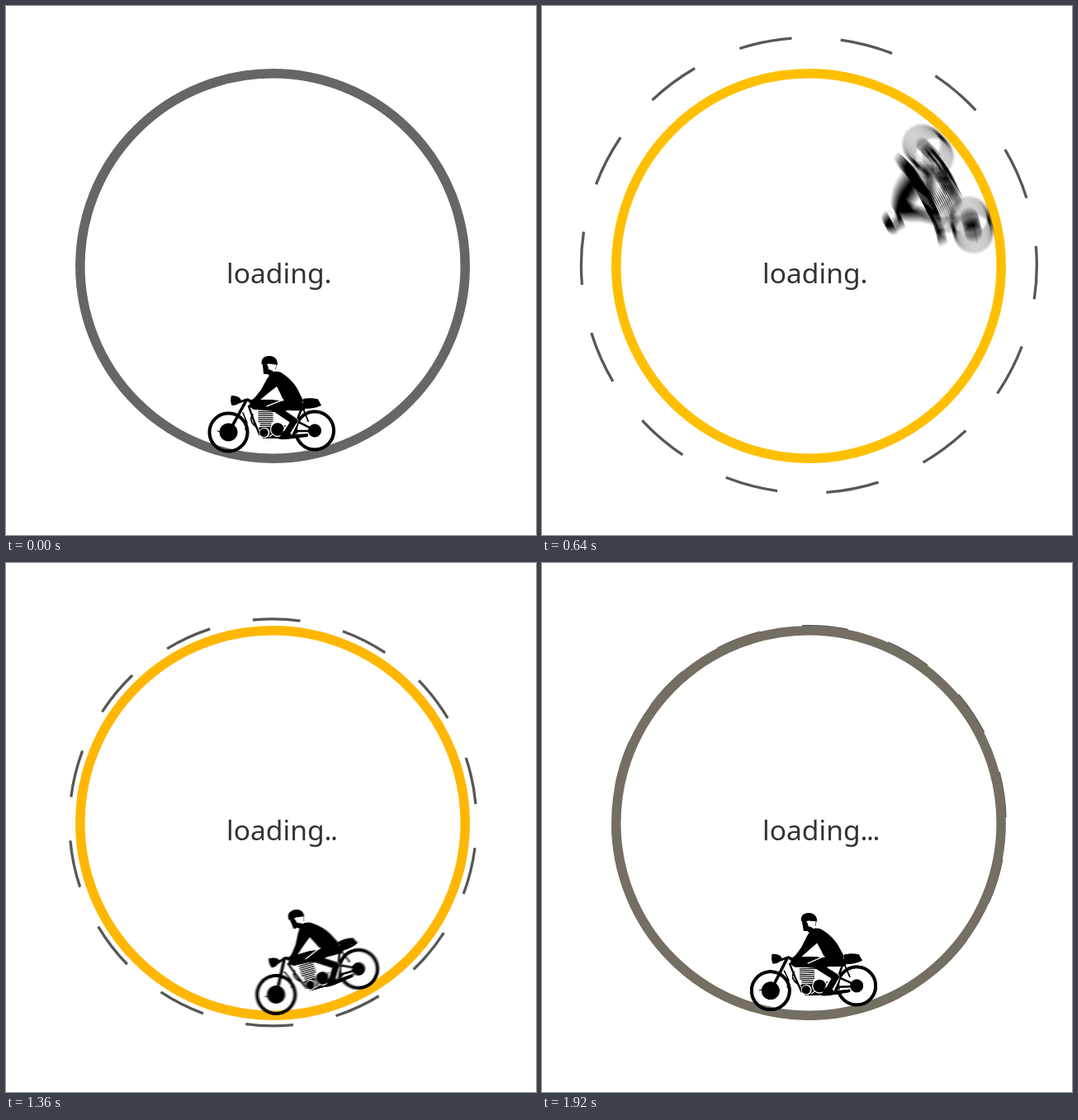
An HTML page with a canvas that plays this animation: 642x641 px, repeating every 1960 ms.

```html
<!DOCTYPE html>
<html lang="en">
<head>
<meta charset="utf-8">
<title>Loading</title>
<style>
  html, body { margin: 0; width: 100%; height: 100%; overflow: hidden; background: #fff; }
  svg, canvas { position: absolute; left: 0; top: 0; width: 642px; height: 641px; }
  text { font: 33.6px "Noto Sans", "Open Sans", sans-serif; fill: #333; }
  #dots { letter-spacing: -1.5px; }
</style>
</head>
<body>
<svg viewBox="0 0 642 641">
  <circle id="dashes" cx="323.4" cy="314.3" r="234" fill="none" stroke="#575757" stroke-width="3.3"
    pathLength="360" stroke-dasharray="13.4 12.3143"/>
  <circle id="ring" cx="323" cy="315" r="233.2" fill="none" stroke="#666" stroke-width="11.5"/>
  <text x="267" y="336">loading<tspan id="dots">.</tspan></text>
</svg>
<canvas id="stage" width="642" height="641"></canvas>
<script>
const LOOP = 1960, STEP = 40, SHUTTER = 19;
const PIVOT = { x: 321, y: 317 };
const BOX = { x: 225, y: 410, w: 195, h: 145 }, SCALE = 2;
const byId = id => document.getElementById(id);
const ctx = byId('stage').getContext('2d');

// time, degrees travelled, degrees per ms
const ride = [
  [0, 0, 0.02], [360, 90.3, 0.7], [640, 241, 0.34], [800, 281.2, 0.19],
  [1120, 326.4, 0.09], [1600, 353.3, 0.024], [1920, 357.9, 0.006], [1960, 358.1, 0.004]
];
const tints = [
  [0, [102, 102, 102]], [360, [255, 194, 0]], [1120, [255, 187, 4]],
  [1600, [255, 178, 2]], [1940, [108, 106, 104]]
];

function segment(keys, t) {
  let i = 0;
  while (i < keys.length - 2 && t >= keys[i + 1][0]) i++;
  const a = keys[i], b = keys[i + 1], span = b[0] - a[0];
  return { a, b, span, u: Math.max(0, Math.min(1, (t - a[0]) / span)) };
}

function rideAngle(t) {
  const { a, b, span, u } = segment(ride, t);
  const u2 = u * u, u3 = u2 * u;
  return a[1] * (2 * u3 - 3 * u2 + 1) + b[1] * (3 * u2 - 2 * u3) +
    span * (a[2] * (u3 - 2 * u2 + u) + b[2] * (u3 - u2));
}

function ringColor(t) {
  const { a, b, u } = segment(tints, t);
  return `rgb(${a[1].map((v, i) => Math.round(v + (b[1][i] - v) * u))})`;
}

function dashRadius(t) {
  if (t < 360) return 234;
  if (t < 1180) return 280 - 46 * 2 ** (-(t - 360) / 80);
  return 237.6 + 42.4 * 2 ** (-(t - 1180) / 80);
}

function makeBike() {
  const c = document.createElement('canvas');
  c.width = BOX.w * SCALE;
  c.height = BOX.h * SCALE;
  const g = c.getContext('2d');
  g.scale(SCALE, SCALE);
  g.translate(-BOX.x, -BOX.y);
  g.lineCap = g.lineJoin = 'round';
  const fill = (d, color = '#000') => { g.fillStyle = color; g.fill(new Path2D(d)); };
  const line = (d, width, color = '#000') => {
    g.strokeStyle = color;
    g.lineWidth = width;
    g.stroke(new Path2D(d));
  };
  const disc = (x, y, r, color = '#000') => {
    g.fillStyle = color;
    g.beginPath();
    g.arc(x, y, r, 0, 7);
    g.fill();
  };
  const wheel = (x, y, r, width, hub) => {
    g.strokeStyle = '#000';
    g.lineWidth = width;
    g.beginPath();
    g.arc(x, y, r - width / 2, 0, 7);
    g.stroke();
    disc(x, y, hub);
  };

  wheel(269.5, 516.5, 25, 4, 11);
  wheel(374, 514.5, 25, 4, 8);

  // fork, mudguard stay and headlamp
  line('M291 478L279 500L270 516', 3.6);
  line('M287 493L292 505L290 513', 1.6);
  line('M256 515L268 517', 1);
  fill('M273 472Q284.5 472.5 285 479Q281 484 273.5 484Q271 478 273 472Z');
  line('M283 480L291 477L300 479', 2.6);

  // tank, seat and tail
  fill('M294 485Q296 478 305 477L322 477L362 482L361 489L330 491L300 489Z');
  fill('M360 476Q370 474 378 476.5L382 484Q373 488.5 359 488Z');
  line('M345 489L361 489', 2.4);

  // frame and engine
  line('M294 485L300 502L307 519L334 524L352 522', 2.4);
  line('M299 495Q293 502 303 510', 1.6);
  line('M358 488L352 503L374 514', 2.6);
  line('M360 488L366 503', 1.8);
  for (let y = 491.5; y < 511; y += 2.4) {
    const w = y < 504 ? 8.5 : 6.5;
    line(`M${314.5 - w} ${y}H${314.5 + w}`, 1.4, '#222');
  }
  fill('M306 511L340 508L353 518L350 524L311 524Z');
  disc(313, 517, 6.3, '#fff');
  disc(312.5, 517, 5.2);
  disc(329, 513, 9, '#fff');
  disc(329, 513, 7.8);
  line('M319 522L323 519', 1.2, '#fff');
  line('M338 523L364 520', 4.4);
  line('M351 515L374 515', 2.6);
  line('M351 518.5L364 518', 0.8, '#fff');

  // near leg, edged in white
  line('M350 482L328 488L348 503L340 519', 11.5, '#fff');
  line('M353 481L326 487.5', 9.5);
  line('M327 488L349 503', 8.5);
  line('M349 503L339 519', 7.5);
  fill('M336 515L345 518L347 523Q340 527 331 523Z');
  fill('M318 486L342 476L357 475L361 486L336 491L324 492Z');

  // torso and arms
  fill('M321 445Q326 441 333 444Q346 452 353 464L360 478Q357 486 344 484Q337 482 333 471L328 461L319 468L301 483L297 480L309 465L316 452Z');
  line('M317 459L308 472L298 480', 4.4);
  line('M336 477L316 485', 1.3, '#fff');
  line('M293 477L299 482', 3.2);

  // head and helmet
  fill('M310.5 433L317 433L318 440L323 442L326 446L319 448L317 446L312 446L311.5 440Z');
  fill('M316 434H328Q328 440 325 443L319 440Z', '#fff');
  fill('M309.5 434Q309 424 319 424Q329 424.5 329 435L319 433.5Z');
  line('M328 434L326.5 440', 0.8, '#444');
  return c;
}

const bike = makeBike();

function drawBike(t) {
  const from = rideAngle(Math.max(0, t - SHUTTER / 2));
  const to = rideAngle(Math.min(LOOP, t + SHUTTER / 2));
  const blur = to - from;
  const n = blur < 0.5 ? 1 : Math.min(30, Math.ceil(blur * 4));
  ctx.setTransform(1, 0, 0, 1, 0, 0);
  ctx.clearRect(0, 0, 642, 641);
  ctx.globalCompositeOperation = 'lighter';
  ctx.globalAlpha = 1 / n;
  for (let i = 0; i < n; i++) {
    const deg = n === 1 ? rideAngle(t) : from + blur * (i + 0.5) / n;
    ctx.setTransform(1, 0, 0, 1, PIVOT.x, PIVOT.y);
    ctx.rotate(deg * Math.PI / 180);
    ctx.drawImage(bike, BOX.x - PIVOT.x, BOX.y - PIVOT.y, BOX.w, BOX.h);
  }
}

function render(t) {
  byId('ring').setAttribute('stroke', ringColor(t));
  const dashes = byId('dashes');
  const turn = 360 / 14 * 4 * t / LOOP - 89.9;
  dashes.setAttribute('r', dashRadius(t).toFixed(2));
  dashes.setAttribute('transform', `rotate(${turn.toFixed(3)} 323.4 314.3)`);
  byId('dots').textContent = '.'.repeat(t < 1000 ? 1 : t < 1480 ? 2 : 3);
  drawBike(t);
}

const start = performance.now();
let shown = -1;
function tick() {
  const t = Math.floor((performance.now() - start) % LOOP / STEP) * STEP;
  if (t !== shown) render(shown = t);
  requestAnimationFrame(tick);
}
tick();
</script>
</body>
</html>
```
